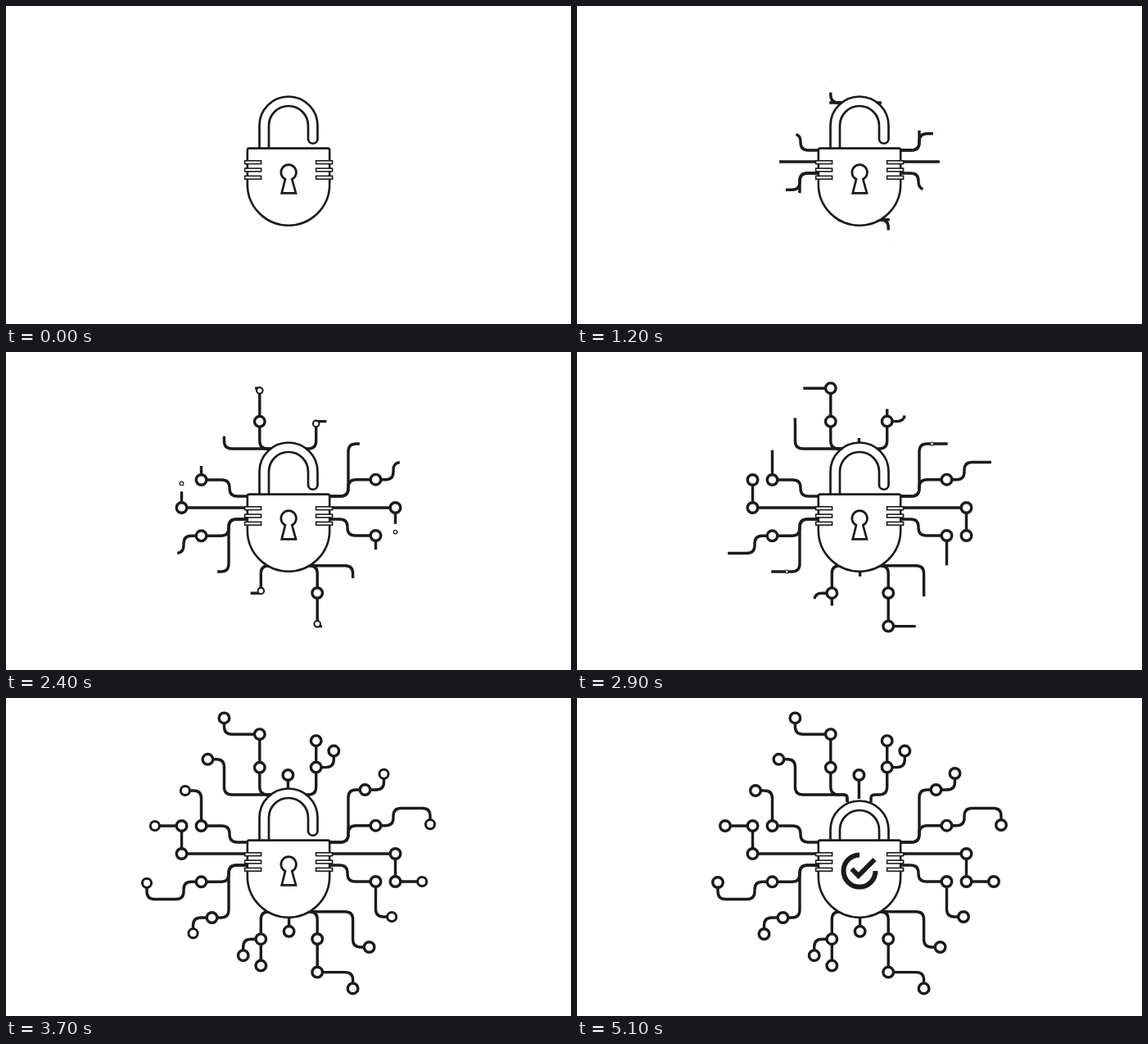
An HTML page for the animation above (5200 ms loop, 690 by 388 pixels).

```html
<!DOCTYPE html>
<html lang="en">
<head>
<meta charset="utf-8">
<title>Circuit padlock</title>
<style>
  html, body { margin: 0; width: 100%; height: 100%; overflow: hidden; background: #fff; }
  svg { display: block; width: 100%; height: 100%; }
  .ink { fill: none; stroke: #1d1a1b; }
  .ink .solid { fill: #fff; }
</style>
</head>
<body>
<svg viewBox="0 0 690 388">
  <g class="ink">
    <g id="wires" stroke-width="3.4"></g>
    <g id="nodes" stroke-width="3.4"></g>
    <path id="shackle" class="solid" stroke-width="2.7"
      d="M309.5 190V146A35.5 35.5 0 0 1 380.5 146V162.7A5.8 5.8 0 0 1 369 162.7V146A24 24 0 0 0 321 146V190"/>
    <path class="solid" stroke-width="2.6"
      d="M297 173.6H393Q395.2 173.6 395.2 176V217.5A50.2 50.2 0 0 1 294.8 217.5V176Q294.8 173.6 297 173.6Z"/>
    <g id="rungs" stroke-width="1.6"></g>
    <path id="keyhole" stroke-width="2.7"
      d="M341 211.3L336.7 228.3H354L349.3 211.3A9.3 9.3 0 1 0 341 211.3Z"/>
    <path id="check" stroke-width="6"
      d="M345 191.5A19.5 19.5 0 1 0 364.5 211M335.5 208.5L343.7 216.8L363.5 197"/>
  </g>
</svg>
<script>
const LOOP = 5200, STEP = 100;
const CX = 345, RADIUS = 6.3, EDGE = 7, BEND = 9.5;
const FIRST_NODE = 1180, GROW = 500;

// Routes: start point, then h/v moves to a coordinate; "o2" puts a node there on beat 2.
// Every route is repeated turned by 180 degrees about (CX, cy).
const GROUPS = [
  { cy: 190, from: 100, to: 3350, beat: 520, routes: [
    '295 190 h214.5o1 v156o2 h181o4',
    '297 176 h273 v156 h238.5o1 v113 h218o4',
    '297 204 h272 v224.3 h238.5o0 h217 v245.5 h172 v225o4',
    '297 204 h272 v268 h251.5o3 h228.5 v288o4'
  ] },
  { cy: 189.4, from: 550, to: 3250, beat: 460, routes: [
    '330 127 v118 h309.8 v84.8o0 v44.2o2 h266.4 v24.4o4',
    '330 127 v118 h266.4 v74.8 h246.4o4',
    '359 127 v118 h378.7 v84.6o2 v52.2o4'
  ] },
  { cy: 189.4, from: 1900, to: 3150, beat: 460, routes: [
    '378.7 84.6 h400.3 v64.6o4',
    '344.4 123 v94o4'
  ] }
];

const $ = id => document.getElementById(id);
const ramp = (t, a, b) => Math.min(1, Math.max(0, (t - a) / (b - a)));

function add(parent, tag, attrs) {
  const el = document.createElementNS('http://www.w3.org/2000/svg', tag);
  for (const k in attrs) el.setAttribute(k, attrs[k]);
  return parent.appendChild(el);
}

function parse(route) {
  const [x0, y0, ...moves] = route.split(' ');
  const points = [{ x: +x0, y: +y0 }];
  for (const move of moves) {
    const { x, y } = points[points.length - 1];
    const [to, beat] = move.slice(1).split('o');
    points.push(move[0] === 'h' ? { x: +to, y, beat } : { x, y: +to, beat });
  }
  return points;
}

// Point at a distance from a towards b.
function toward(a, b, dist) {
  const k = dist / Math.hypot(b.x - a.x, b.y - a.y);
  return { x: a.x + (b.x - a.x) * k, y: a.y + (b.y - a.y) * k };
}

function roundedPath(points) {
  const at = p => `${p.x} ${p.y}`;
  const last = points.length - 1;
  let d = 'M' + at(points[0]);
  for (let i = 1; i < last; i++) {
    const [a, p, b] = points.slice(i - 1, i + 2);
    const half = q => Math.hypot(q.x - p.x, q.y - p.y) / 2;
    const r = Math.min(BEND, half(a), half(b));
    d += p.beat ? 'L' + at(p) : `L${at(toward(p, a, r))}Q${at(p)} ${at(toward(p, b, r))}`;
  }
  return d + 'L' + at(toward(points[last], points[last - 1], EDGE - 0.5));
}

const wires = [], nodes = [];

function build(points, { from, to, beat }) {
  const el = add($('wires'), 'path', { d: roundedPath(points), pathLength: 1 });
  wires.push({ el, from, to });
  points.forEach((p, i) => {
    if (!p.beat) return;
    nodes.push({
      el: add($('nodes'), 'circle', { cx: p.x, cy: p.y, r: RADIUS, class: 'solid' }),
      root: toward(p, points[i - 1], EDGE),
      start: FIRST_NODE + beat * p.beat
    });
  });
}

for (const group of GROUPS)
  for (const route of group.routes) {
    const points = parse(route);
    build(points, group);
    build(points.map(p => ({ ...p, x: 2 * CX - p.x, y: 2 * group.cy - p.y })), group);
  }

for (const x of [291.6, 378.6])
  for (let i = 0; i < 3; i++)
    add($('rungs'), 'rect', { x, y: 188.8 + 9.3 * i, width: 20, height: 3.8, class: 'solid' });

function scaleAt(el, { x, y }, s, turn = 0) {
  el.setAttribute('visibility', s > 0 ? 'visible' : 'hidden');
  el.setAttribute('transform', `translate(${x} ${y}) rotate(${turn}) scale(${s}) translate(${-x} ${-y})`);
}

function render(t) {
  const badge = { x: CX, y: 211 };
  for (const w of wires) w.el.setAttribute('stroke-dasharray', `${ramp(t, w.from, w.to)} 2`);
  for (const n of nodes) scaleAt(n.el, n.root, ramp(t, n.start, n.start + GROW));
  $('shackle').setAttribute('transform', `translate(0 ${15 * ramp(t, 3900, 4200)})`);
  scaleAt($('keyhole'), badge, 1 - ramp(t, 4100, 4300), -3 * ramp(t, 4000, 4100));
  scaleAt($('check'), badge, ramp(t, 4200, 4500));
}

const begin = performance.now();
function tick() {
  const t = (performance.now() - begin) % LOOP;
  render(Math.floor(t / STEP) * STEP);
  requestAnimationFrame(tick);
}
tick();
</script>
</body>
</html>
```
